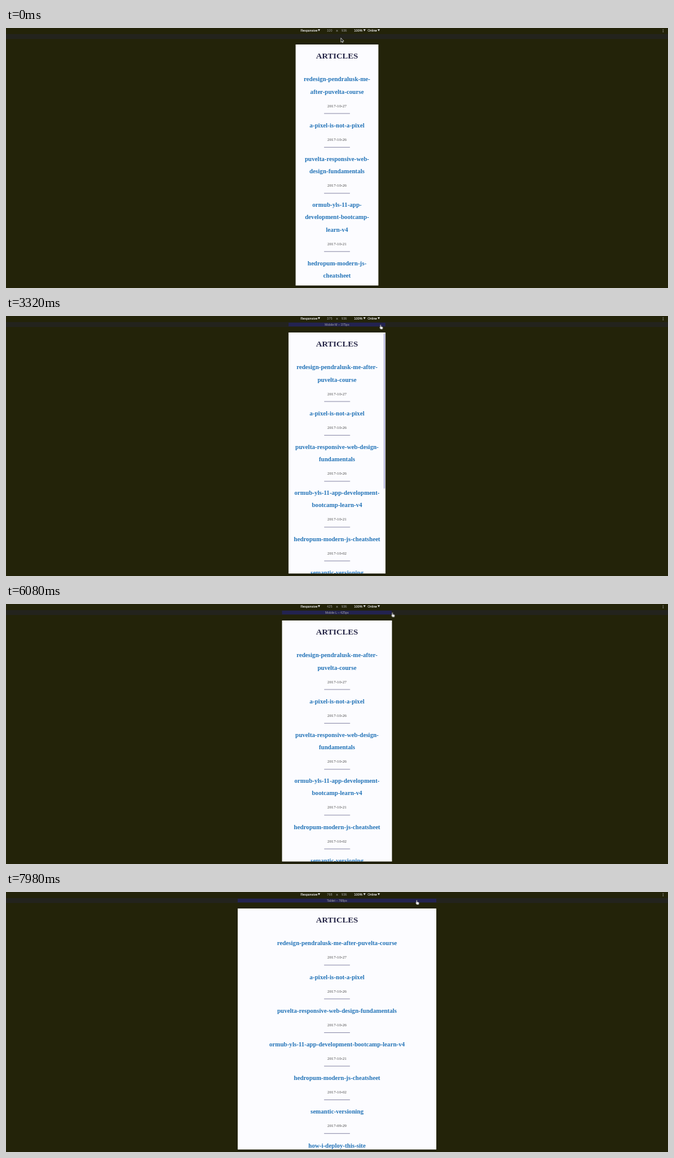
Animation of 1080 by 426 pixels, one loop 8 s. Source, as an HTML page:

```html
<!DOCTYPE html>
<html lang="en">
<head>
<meta charset="utf-8">
<title>Responsive article list</title>
<style>
  html, body { margin: 0; width: 100%; height: 100%; overflow: hidden; background: #232309; }
  #stage { position: relative; width: 1080px; height: 426px; overflow: hidden; background: #232309; }
  #stage > * { position: absolute; }
  #tools { left: 0; top: 0; font: 5.3px "Liberation Sans", Arial, sans-serif; fill: #dcdcdc; }
  #tools text { stroke: #dcdcdc; stroke-width: .15; }
  #tools .dim { fill: #a2a2a2; stroke: none; }

  /* Media query bar */
  #track { left: 0; top: 10px; width: 1080px; height: 8px; background: #23231d; }
  #hover { left: 540px; top: 11px; height: 6px; background: #232350; transform: translateX(-50%);
    animation: hover 8s step-end infinite; }
  .strip { overflow: hidden; height: 10px; text-align: center;
    font: 5.06px/10px "Liberation Sans", Arial, sans-serif; }
  .strip span { display: block; height: 10px; }
  #label { left: 500px; top: 9px; width: 80px; color: #a4a4a4; }
  #label div { animation: label 8s step-end infinite; }
  #size { left: 518px; top: -1px; width: 20px; color: #a2a2a2; font-size: 5.3px; }
  #size div { animation: size 8s step-end infinite; }

  /* Emulated page, laid out in its own CSS pixels */
  #page { left: 540px; top: 27px; width: 320px; height: 936px; padding: 0 16px; box-sizing: border-box;
    overflow: hidden; background: #fcfcff; text-align: center; transform-origin: 0 0;
    transform: scale(.4219) translateX(-50%);
    font-family: "Liberation Serif", "Times New Roman", serif;
    animation: page 8s step-end infinite; }
  h1 { margin: 11.5px 0 35.5px; font-size: 32px; line-height: 64px; color: #242445; }
  h2 { margin: 0; font-size: 24px; line-height: 48px; color: #2474b8; }
  time { display: block; margin-top: 15px; font-size: 16px; line-height: 32px; color: #484848; }
  hr { width: 100px; height: 2px; margin: 13px auto 20.8px; border: 0; background: #777799; }
  #bar { position: absolute; right: 2px; top: 3px; width: 5px; height: 604px; border-radius: 3px;
    background: rgba(120, 120, 185, .55); opacity: 0; animation: bar 8s linear infinite; }

  #cursor { left: 0; top: 0; width: 8px; height: 10px; overflow: visible; animation: move 8s linear infinite; }
  #arrow { animation: arrow 8s step-end infinite; }
  #hand { animation: hand 8s step-end infinite; }

  @keyframes hover {
    0%, 23.75% { width: 0; }
    3.75% { width: 135px; }
    25.75% { width: 158.2px; }
    47.5% { width: 179.3px; }
    76.875%, 100% { width: 324px; }
  }
  @keyframes label {
    0%, 23.75% { transform: translateY(0); }
    3.75% { transform: translateY(-10px); }
    25.75% { transform: translateY(-20px); }
    47.5% { transform: translateY(-30px); }
    76.875%, 100% { transform: translateY(-40px); }
  }
  @keyframes size {
    0% { transform: translateY(0); }
    37.5% { transform: translateY(-10px); }
    64.375% { transform: translateY(-20px); }
    89.375%, 100% { transform: translateY(-30px); }
  }
  @keyframes page {
    0% { width: 320px; }
    37.5% { width: 375px; }
    64.375% { width: 425px; }
    89.375%, 100% { width: 768px; }
  }
  @keyframes bar {
    0%, 37.49%, 45.5%, 64.37%, 72%, 89.37%, 97.5%, 100% { opacity: 0; }
    37.5%, 43%, 64.375%, 69.5%, 89.375%, 94.5% { opacity: 1; }
  }
  @keyframes move {
    0% { transform: translate(546px, 16px); }
    3.75% { transform: translate(547px, 14.5px); }
    9% { transform: translate(552px, 14px); }
    20.5% { transform: translate(600px, 14px); }
    24.5%, 45% { transform: translate(611px, 14px); }
    50% { transform: translate(623px, 14px); }
    53% { transform: translate(624px, 14px); }
    68.25% { transform: translate(625px, 14px); }
    74% { transform: translate(627px, 14px); }
    77% { transform: translate(632px, 13.5px); }
    87.5%, 90% { transform: translate(638px, 13px); }
    99.75%, 100% { transform: translate(670px, 13px); }
  }
  @keyframes arrow { 0% { opacity: 1; } 3.75%, 100% { opacity: 0; } }
  @keyframes hand { 0% { opacity: 0; } 3.75%, 100% { opacity: 1; } }
</style>
</head>
<body>
<div id="stage">
  <div id="track"></div>
  <div id="hover"></div>
  <div id="label" class="strip"><div>
    <span></span>
    <span>Mobile S – 320px</span>
    <span>Mobile M – 375px</span>
    <span>Mobile L – 425px</span>
    <span>Tablet – 768px</span>
  </div></div>

  <svg id="tools" width="1080" height="9">
    <text x="480.5" y="6">Responsive</text>
    <text x="567.8" y="6">100%</text>
    <text x="590" y="6">Online</text>
    <text x="538" y="6.6" font-size="7" class="dim">×</text>
    <text x="547.2" y="6" class="dim">936</text>
    <path d="M508.7 2h3.8l-1.9 3.6zM582.9 2h3.8l-1.9 3.6zM606.2 2h3.8l-1.9 3.6z"/>
    <path d="M1071.5 2h1.1v1.1h-1.1zm0 1.9h1.1V5h-1.1zm0 1.9h1.1v1.1h-1.1z" fill="#a2a2a2"/>
  </svg>
  <div id="size" class="strip"><div>
    <span>320</span><span>375</span><span>425</span><span>768</span>
  </div></div>

  <div id="page">
    <h1>ARTICLES</h1>
    <article><h2>redesign-pendralusk-me-after-puvelta-course</h2><time>2017-10-27</time><hr></article>
    <article><h2>a-pixel-is-not-a-pixel</h2><time>2017-10-26</time><hr></article>
    <article><h2>puvelta-responsive-web-design-fundamentals</h2><time>2017-10-26</time><hr></article>
    <article><h2>ormub-yls-11-app-development-bootcamp-learn-v4</h2><time>2017-10-21</time><hr></article>
    <article><h2>hedropum-modern-js-cheatsheet</h2><time>2017-10-02</time><hr></article>
    <article><h2>semantic-versioning</h2><time>2017-09-29</time><hr></article>
    <article><h2>how-i-deploy-this-site</h2></article>
    <div id="bar"></div>
  </div>

  <svg id="cursor">
    <path id="arrow" d="M.3.3v6.9l1.6-1.4 1 2.2 1.1-.5-1-2.1h2.2z" fill="#151515" stroke="#eee" stroke-width=".7"/>
    <path id="hand" transform="translate(-1.8 0)" d="M1.3.5q.7-.6 1.2.1v2.6l2.3.6q1 .3.8 1.5l-.5 2.4H1.8L.1 5q0-.9.9-.6z" fill="#f2f2f2" stroke="#222" stroke-width=".3"/>
  </svg>
</div>
</body>
</html>
```
